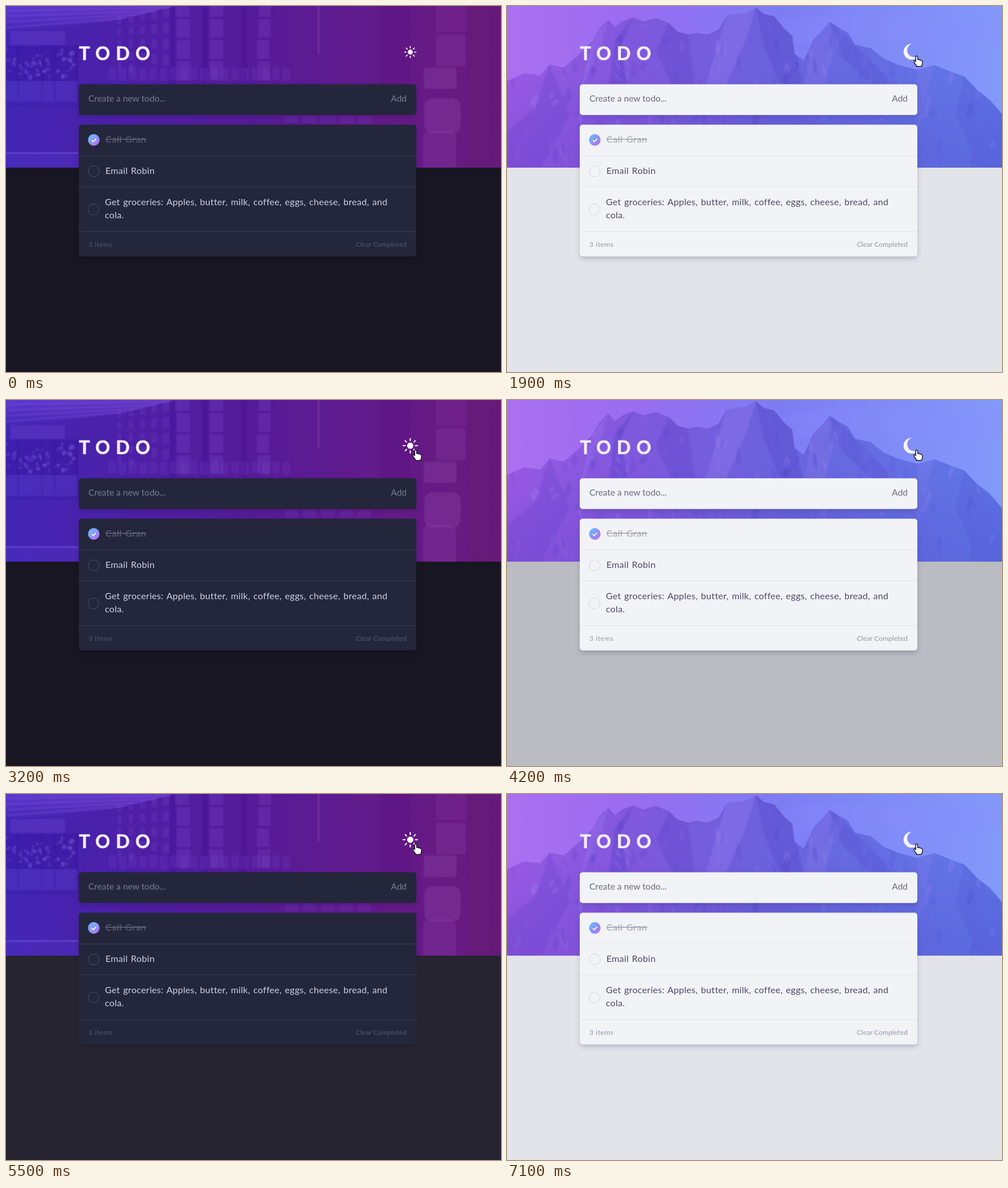
An HTML page that plays this animation: 871x643 px, repeating every 7200 ms.

```html
<!DOCTYPE html>
<html lang="en">
<head>
<meta charset="utf-8">
<title>Todo</title>
<style>
html, body { margin: 0; width: 100%; height: 100%; overflow: hidden; background: #171622; }
svg {
  display: block; width: 871px; height: 643px;
  font-family: Lato, "Open Sans", sans-serif; font-size: 16px;
  --card: #24263b; --line: #393a4e; --text: #cfd1e6; --hint: #7b7c8f;
  --done: #62647a; --small: #55576d; --ring: #4e5067; --shadow: rgba(0,0,0,.14);
}
svg.light {
  --card: #f2f3f7; --line: #e2e3e9; --text: #494a66; --hint: #696a80;
  --done: #a2a3ae; --small: #9293a5; --ring: #d5d6de; --shadow: rgba(50,50,80,.25);
}
.night, .light .day { display: inline; }
.day, .light .night { display: none; }
.card { fill: var(--card); filter: drop-shadow(0 4px 4px var(--shadow)); }
.lines { stroke: var(--line); }
.ring { fill: none; stroke: var(--ring); }
.item { fill: var(--text); letter-spacing: .3px; word-spacing: 1.2px; }
.done { fill: var(--done); letter-spacing: .7px; }
.hint { fill: var(--hint); font-size: 15.5px; }
.small { fill: var(--small); font-size: 12px; }
.end { text-anchor: end; }
</style>
</head>
<body>
<svg id="stage" viewBox="0 0 871 643">
  <defs>
    <linearGradient id="nightBase">
      <stop offset="0" stop-color="#4226b6"/>
      <stop offset=".22" stop-color="#4c20a8"/>
      <stop offset=".5" stop-color="#561b98"/>
      <stop offset=".75" stop-color="#621b8a"/>
      <stop offset="1" stop-color="#6a197c"/>
    </linearGradient>
    <linearGradient id="sky">
      <stop offset="0" stop-color="#ab70f1"/>
      <stop offset=".25" stop-color="#9a6cf0"/>
      <stop offset=".55" stop-color="#7d7df3"/>
      <stop offset="1" stop-color="#8399fb"/>
    </linearGradient>
    <linearGradient id="rock">
      <stop offset="0" stop-color="#9a5ae4"/>
      <stop offset=".25" stop-color="#8058dd"/>
      <stop offset=".55" stop-color="#6a63de"/>
      <stop offset="1" stop-color="#5f7ae8"/>
    </linearGradient>
    <linearGradient id="deep" x2="0" y2="1">
      <stop offset=".4" stop-color="#4a35bc" stop-opacity="0"/>
      <stop offset="1" stop-color="#4a35bc" stop-opacity=".2"/>
    </linearGradient>
    <linearGradient id="glow" x2="0" y2="1">
      <stop offset="0" stop-color="#7d55ee" stop-opacity=".45"/>
      <stop offset="1" stop-color="#7d55ee" stop-opacity="0"/>
    </linearGradient>
    <linearGradient id="tick" x2="1" y2="1">
      <stop offset="0" stop-color="#5cc8ff"/>
      <stop offset="1" stop-color="#bd62f3"/>
    </linearGradient>
    <filter id="soft"><feGaussianBlur stdDeviation="1.2"/></filter>
    <clipPath id="band"><rect width="871" height="284"/></clipPath>
    <clipPath id="ridgeClip"><path id="ridge" d="M0 132L30 118 58 122 75 103 100 108 128 84 150 62 162 40 178 24 190 37 203 27 222 20 240 27 262 21 285 30 300 45 318 50 334 47 352 50 372 42 386 17 404 14 420 12 438 2 452 14 470 18 488 40 502 52 506 84 522 96 540 58 556 42 568 28 584 38 600 47 612 68 640 74 662 92 690 104 722 112 752 104 778 114 805 124 828 148 850 165 871 190V284H0Z"/></clipPath>
  </defs>

  <rect id="page" width="871" height="643"/>

  <g class="night" clip-path="url(#band)">
    <rect width="871" height="284" fill="url(#nightBase)"/>
    <path d="M0 0H300L190 26 0 46Z" fill="url(#glow)"/>
    <g id="street" filter="url(#soft)"></g>
  </g>

  <g class="day" clip-path="url(#band)">
    <rect width="871" height="284" fill="url(#sky)"/>
    <path d="M470 30Q560 8 680 22T871 12V60Q780 75 700 62T500 70Z" fill="#8f8cff" opacity=".2" filter="url(#soft)"/>
    <use href="#ridge" fill="url(#rock)"/>
    <g clip-path="url(#ridgeClip)">
      <g id="facets" filter="url(#soft)"></g>
      <rect width="871" height="284" fill="url(#deep)"/>
    </g>
  </g>

  <text x="128.5" y="95" font-size="32" font-weight="700" letter-spacing="10.2" fill="#f3effc" stroke="#f3effc" stroke-width=".7">TODO</text>

  <g id="icon">
    <g class="night" fill="#fff" stroke="#fff" stroke-width="1.6" stroke-linecap="round">
      <circle r="4.4" stroke="none"/>
      <g id="rays"></g>
    </g>
    <path class="day" d="M1-11.2A11.2 11.2 0 1 0 10.4 5A9.6 9.6 0 1 1 1-11.2Z" fill="#f6f3ff"/>
  </g>

  <rect class="card" x="128" y="137.5" width="594" height="54" rx="5"/>
  <text class="hint" x="145" y="168">Create a new todo...</text>
  <text class="hint end" x="705" y="168">Add</text>

  <rect class="card" x="128" y="208.5" width="594" height="231.5" rx="5"/>
  <path class="lines" d="M128 263.5H722M128 317.5H722M128 396.5H722"/>

  <circle cx="154.5" cy="235.3" r="10.2" fill="url(#tick)"/>
  <path d="M151 235.8l2.5 2.5 5-5" fill="none" stroke="#fff" stroke-width="1.8"/>
  <circle class="ring" cx="154.5" cy="290.5" r="9.6"/>
  <circle class="ring" cx="154" cy="357.5" r="9.6"/>

  <text class="item done" x="175" y="239.5" text-decoration="line-through">Call Gran</text>
  <text class="item" x="175" y="294.5">Email Robin</text>
  <text class="item" x="174" y="349.5">Get groceries: Apples, butter, milk, coffee, eggs, cheese, bread, and</text>
  <text class="item" x="174" y="373">cola.</text>
  <text class="small" x="145" y="422.5" letter-spacing=".6">3 items</text>
  <text class="small end" x="705" y="422.5" letter-spacing=".1">Clear Completed</text>

  <g id="cursor" fill="#fff" stroke="#14131c" stroke-width="1.4" stroke-linejoin="round">
    <path id="arrow" d="M0 0V15.5L3.7 12.2 6.2 17.8 8.7 16.7 6.3 11.3H11.2Z"/>
    <path id="hand" d="M-.8 10V2a1.7 1.7 0 0 1 3.4 0V6.5q2.2-.8 3.2.8q2-.6 2.9.9q2.2-.3 2.3 1.8V13q0 3-1.8 5.7H.8Q.2 16.6-1.8 14.3L-4 10.9q-.5-2.2 1.3-2.2q1 0 1.9 1.6Z"/>
  </g>
</svg>
<script>
const $ = id => document.getElementById(id);
const NS = 'http://www.w3.org/2000/svg';
const LOOP = 7200, STEP = 100, FADE = 500;
const DARK = [23, 22, 34], LIGHT = [227, 228, 234];
const CLICKS = [1290, 2650, 3950, 5160, 6150];
const ENTER = 350, ARRIVE = 1100, HOVER = 900;

let seed = 11;
const rand = (a, b) => {
  seed = (seed * 16807) % 2147483647;
  return a + (b - a) * seed / 2147483647;
};
const clamp = v => Math.max(0, Math.min(1, v));
const mix = (a, b, k) => a + (b - a) * k;

function add(parent, tag, attrs) {
  const el = document.createElementNS(NS, tag);
  for (const k in attrs) el.setAttribute(k, attrs[k]);
  $(parent).appendChild(el);
}
function block(x, y, width, height, fill, opacity, rx = 0) {
  add('street', 'rect', { x, y, width, height, fill, opacity, rx });
}

function drawStreet() {
  const pale = '#8a58e0', pink = '#9a4fb4', shade = '#2f1690';
  // canopy stripes and the shop on the left
  for (let i = 0; i < 4; i++)
    add('street', 'path', { d: `M0 ${8 + i * 10}L${290 - i * 26} ${3 + i * 6}`, stroke: pale, 'stroke-width': 3, opacity: .28 });
  block(8, 44, 96, 24, pale, .22);
  block(0, 70, 126, 62, shade, .2);
  for (let i = 0; i < 55; i++)
    block(rand(0, 122), rand(74, 122), rand(2, 7), rand(2, 8), '#8a70e8', rand(.15, .45), 2);
  for (const x of [20, 62, 84, 124]) block(x, 68, 3, 98, shade, .45);
  block(0, 132, 126, 36, '#5a44d4', .25);
  block(0, 172, 128, 3, shade, .35);
  block(0, 257, 128, 3, '#7d62ea', .5);
  block(0, 262, 128, 22, '#5a38cc', .25);
  // receding columns of windows
  for (let i = 0; i < 5; i++) {
    const x = 196 + i * 20;
    for (let y = 18 - i * 4; y < 104; y += 20 + i * 2) block(x, y, 7 + i, 14 + i, pale, .16);
  }
  for (const [x, w] of [[300, 24], [360, 24], [443, 22]])
    for (let y = -14; y < 128; y += 37) block(x + rand(-2, 2), y, w, 33, pale, .2, 2);
  for (const x of [288, 345, 414]) block(x, 0, 10, 137, shade, .22);
  block(549, 0, 2, 84, pink, .6);
  for (let x = 180; x < 500; x += 18) block(x, 107 + x % 4, 14, 23, pale, .14, 4);
  for (let x = 490; x < 640; x += 32) block(x, 193, 25, 13, pale, .14, 3);
  // large blocks on the right
  block(660, 0, 52, 137, '#4c137c', .12);
  block(757, -10, 53, 56, pink, .16, 3);
  block(757, 50, 52, 56, pink, .2, 3);
  block(735, 108, 58, 38, pink, .28, 5);
  block(736, 162, 64, 62, pink, .28, 14);
  block(734, 220, 58, 74, pink, .22, 10);
  block(812, 0, 59, 284, '#62146f', .3);
}

function drawFacets() {
  const dark = '#4c3ac0', pale = '#a58af5';
  const face = (d, fill, opacity) => add('facets', 'path', { d, fill, opacity });
  face('M178 24L160 90 128 150 150 60Z', pale, .22);
  face('M222 20L200 70 212 137H180L190 60Z', dark, .28);
  face('M285 30L262 80 290 137H330L318 50Z', dark, .25);
  face('M438 2L420 60 386 137H350L386 17Z', pale, .25);
  face('M438 2L452 70 480 137H520L502 52 470 18Z', dark, .25);
  face('M568 28L575 80 560 137H522L540 58Z', pale, .18);
  face('M568 28L590 90 640 137H680L612 68Z', dark, .2);
  face('M752 104L735 170 722 230V112Z', pale, .15);
  face('M805 124L790 190 830 284H871V190L828 148Z', dark, .12);
  face('M75 103L50 180 0 220V284H60L110 190Z', dark, .2);
  for (let i = 0; i < 220; i++) {
    const x = rand(0, 871), y = rand(10, 265), w = rand(3, 9), h = rand(12, 38), lean = rand(-10, 10);
    face(`M${x} ${y}l${w} ${h * .4}l${lean} ${h * .6}l${-w} ${-h * .3}Z`, i % 2 ? dark : pale, rand(.08, .26));
  }
}

function drawRays() {
  for (let a = 0; a < 360; a += 45)
    add('rays', 'path', { d: 'M0-7.3V-10.1', transform: `rotate(${a})` });
}

// cubic-bezier(.25, .1, .25, 1)
function ease(x) {
  if (x <= 0 || x >= 1) return clamp(x);
  let lo = 0, hi = 1, u = x;
  for (let i = 0; i < 20; i++) {
    u = (lo + hi) / 2;
    const bx = .75 * u * (1 - u) + u ** 3;
    if (bx < x) lo = u; else hi = u;
  }
  return .3 * u * (1 - u) ** 2 + 3 * u * u * (1 - u) + u ** 3;
}

function render(t) {
  const past = CLICKS.filter(c => t >= c);
  const light = past.length % 2 === 1;
  const k = past.length ? ease((t - past[past.length - 1]) / FADE) : 1;
  const from = light ? DARK : LIGHT, to = light ? LIGHT : DARK;
  $('page').setAttribute('fill', `rgb(${from.map((v, i) => Math.round(mix(v, to[i], k)))})`);
  $('stage').classList.toggle('light', light);

  const p = clamp((t - ENTER) / (ARRIVE - ENTER));
  const q = p * p * (3 - 2 * p);
  const over = t >= HOVER;
  $('cursor').setAttribute('transform', `translate(${mix(876, 720, q)} ${mix(412, 87.5, q)})`);
  $('cursor').style.display = t < ENTER ? 'none' : '';
  $('arrow').style.display = over ? 'none' : '';
  $('hand').style.display = over ? '' : 'none';

  const grow = ease((t - HOVER) / 300);
  $('icon').setAttribute('transform', `translate(711.3 ${mix(81, 80.3, grow)}) scale(${mix(1, 1.25, grow)})`);
}

drawStreet();
drawFacets();
drawRays();
const start = performance.now();
function tick() {
  const t = (performance.now() - start) % LOOP;
  render(Math.floor(t / STEP) * STEP);
  requestAnimationFrame(tick);
}
tick();
</script>
</body>
</html>
```
